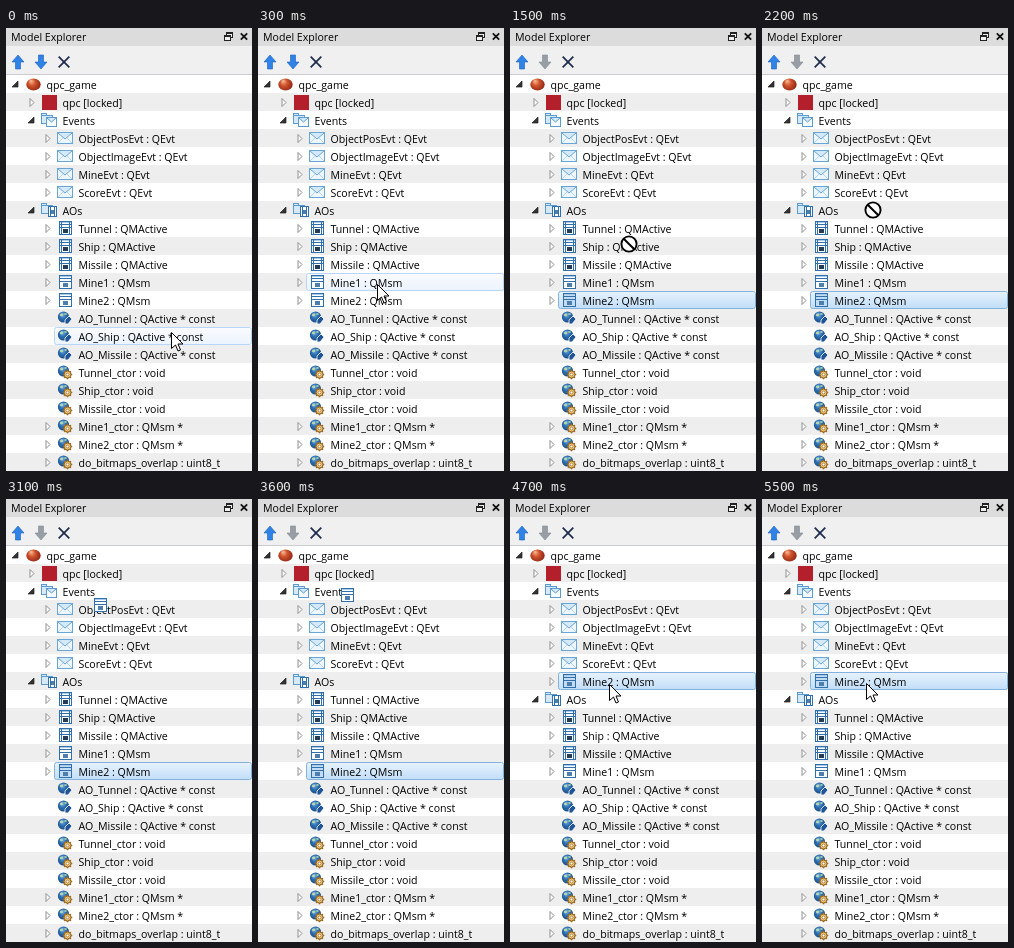
Animation, 246 px wide and 443 px high, one loop 5700 ms. Source, as an HTML page with a canvas:

```html
<!DOCTYPE html>
<html lang="en">
<head>
<meta charset="utf-8">
<title>Model Explorer</title>
<style>
html, body { margin: 0; width: 100%; height: 100%; overflow: hidden; background: #f0f0f0; }
canvas { display: block; width: 246px; height: 443px; }
</style>
</head>
<body>
<canvas id="stage" width="246" height="443"></canvas>
<script>
const ctx = document.getElementById('stage').getContext('2d');
const W = 246, H = 443, LOOP = 5700, STEP = 100;
const TOP = 47, ROW = 18;
const SELECT_AT = 1000, DRAG_AT = 1200, DROP_AT = 4100;
const BLUE = '#2f6fab', SKY = '#5b9bd0', PALE = '#d5e9f8';

// Tree items: [level, icon, label, expander]
const events = ['ObjectPosEvt', 'ObjectImageEvt', 'MineEvt', 'ScoreEvt']
  .map(n => [2, 'event', n + ' : QEvt', 'closed']);
const active = ['Tunnel', 'Ship', 'Missile'];
const mine2 = [2, 'machine', 'Mine2 : QMsm', 'closed'];
const eventsHead = [[0, 'model', 'qpc_game', 'open'], [1, 'framework', 'qpc [locked]', 'closed'],
  [1, 'package', 'Events', 'open'], ...events];
const objects = [[1, 'group', 'AOs', 'open'],
  ...active.map(n => [2, 'active', n + ' : QMActive', 'closed']),
  [2, 'machine', 'Mine1 : QMsm', 'closed']];
const members = [
  ...active.map(n => [2, 'attribute', `AO_${n} : QActive * const`]),
  ...active.map(n => [2, 'operation', n + '_ctor : void']),
  ...['Mine1_ctor : QMsm *', 'Mine2_ctor : QMsm *', 'do_bitmaps_overlap : uint8_t']
    .map(label => [2, 'operation', label, 'closed'])];
const before = [...eventsHead, ...objects, mine2, ...members];
const after = [...eventsHead, mine2, ...objects, ...members];

// Pointer path: [time, x, y]
const path = [[0, 165, 304], [400, 103, 240], [600, 86, 267], [800, 88, 271], [1000, 88, 271],
  [1500, 119, 216], [2000, 110, 182], [2100, 112, 183], [2200, 111, 182], [2700, 93, 126],
  [2800, 95, 118], [3100, 85, 97], [3300, 80, 92], [3600, 80, 87], [4400, 80, 87],
  [4700, 99, 185], [4800, 99, 185], [4900, 101, 186], [5000, 104, 185], [5100, 104, 185],
  [5200, 104, 183], [5400, 104, 183], [5500, 104, 184], [LOOP, 104, 184]];

function pointerAt(t) {
  const i = path.findIndex(p => p[0] > t);
  const [t0, x0, y0] = path[i - 1], [t1, x1, y1] = path[i];
  const k = (t - t0) / (t1 - t0);
  return [Math.round(x0 + (x1 - x0) * k), Math.round(y0 + (y1 - y0) * k)];
}

function rect(x, y, w, h, color) {
  ctx.fillStyle = color;
  ctx.fillRect(x, y, w, h);
}

function box(x, y, w, h, fill, stroke) {
  rect(x, y, w, h, stroke);
  rect(x + 1, y + 1, w - 2, h - 2, fill);
}

function shape(points, fill, stroke, width = 1, close = true) {
  ctx.beginPath();
  points.forEach(([x, y]) => ctx.lineTo(x, y));
  if (close) ctx.closePath();
  if (fill) { ctx.fillStyle = fill; ctx.fill(); }
  if (stroke) { ctx.strokeStyle = stroke; ctx.lineWidth = width; ctx.stroke(); }
}

function oval(x, y, rx, ry, fill, stroke, width = 1) {
  ctx.beginPath();
  ctx.ellipse(x, y, rx, ry, 0, 0, Math.PI * 2);
  if (fill) { ctx.fillStyle = fill; ctx.fill(); }
  if (stroke) { ctx.strokeStyle = stroke; ctx.lineWidth = width; ctx.stroke(); }
}

const disc = (x, y, r, ...paint) => oval(x, y, r, r, ...paint);

function text(label, x, y) {
  ctx.font = '10.6px "Open Sans", "Noto Sans", sans-serif';
  ctx.fillStyle = '#000';
  ctx.fillText(label, x, y);
}

function cross(x, y, r, color, width) {
  shape([[x - r, y - r], [x + r, y + r]], null, color, width, false);
  shape([[x + r, y - r], [x - r, y + r]], null, color, width, false);
}

function globe() {
  const g = ctx.createRadialGradient(-3, -4, 0, -1.5, -1, 7);
  g.addColorStop(0, '#8cc0ea');
  g.addColorStop(0.45, '#2f72b5');
  g.addColorStop(1, '#123f78');
  disc(-1.5, -1, 5.6, g);
  oval(-3.5, -3, 1.6, 1.2, '#b9d8a8');
  oval(0.5, -4, 1.4, 1, '#9cc9a4');
}

function gear(x, y, r) {
  for (let i = 0; i < 8; i++) {
    const a = i * Math.PI / 4;
    disc(x + Math.cos(a) * r, y + Math.sin(a) * r, 1.1, '#9a6a24');
  }
  disc(x, y, r - 0.4, '#ecc67a', '#9a6a24');
  disc(x, y, 1.4, '#fff', '#9a6a24', 0.7);
}

function classBox(selected) {
  box(-6, -7, 13, 14, selected ? '#c4dcf3' : '#fff', BLUE);
  rect(-5, -6, 11, 1, '#a9cbe8');
  rect(-5, -4, 11, 1, BLUE);
  rect(-5, -1, 11, 1, BLUE);
  rect(-2, 1, 5, 4, '#4d7fae');
}

function folder() {
  box(-8, -7, 6, 4, PALE, SKY);
  box(-8, -5, 12, 9, PALE, SKY);
}

// Every icon is drawn around its centre.
const icons = {
  model() {
    const g = ctx.createRadialGradient(-2, -3, 0.5, 0, 0, 8);
    g.addColorStop(0, '#f3b48f');
    g.addColorStop(0.4, '#d2552e');
    g.addColorStop(1, '#8c2413');
    oval(0.5, 0.5, 7.2, 6, g);
  },
  framework() { rect(-7, -7, 15, 15, '#b3202c'); },
  package() {
    folder();
    box(-3, -3, 11, 10, '#f4faff', SKY);
    shape([[-2, -2], [2.5, 2], [7, -2]], PALE, SKY, 1, false);
  },
  group() {
    folder();
    box(-1, -4, 9, 11, '#fff', BLUE);
    rect(1, -4, 1, 11, BLUE);
    rect(5, -4, 1, 11, BLUE);
    rect(2, 0, 3, 4, '#4b7fae');
  },
  event() {
    box(-8, -6, 16, 12, '#eef7fe', '#68a6d8');
    shape([[-7, -5], [0, 1], [7, -5]], PALE, '#68a6d8', 1, false);
    shape([[-7, 5], [-2, 0]], null, '#b5d5ee', 1, false);
    shape([[7, 5], [2, 0]], null, '#b5d5ee', 1, false);
  },
  machine: classBox,
  active(selected) {
    classBox(selected);
    rect(-4, -7, 1, 14, BLUE);
    rect(4, -7, 1, 14, BLUE);
    rect(-2, 1, 5, 4, '#243c55');
  },
  attribute() {
    globe();
    shape([[0, 2], [4, -2], [7, 1], [3, 6], [0, 6]], '#1f5596', '#fff', 0.8);
  },
  operation() {
    globe();
    gear(2.5, 2.5, 3.8);
  }
};

function drawIcon(name, x, y, selected) {
  ctx.save();
  ctx.translate(x, y);
  icons[name](selected);
  ctx.restore();
}

function highlight(level, y, from, to, border) {
  const x = 16 + level * 16;
  const g = ctx.createLinearGradient(0, y, 0, y + ROW);
  g.addColorStop(0, from);
  g.addColorStop(1, to);
  ctx.beginPath();
  ctx.roundRect(x + 0.5, y + 0.5, W - x - 1, ROW - 1, 2);
  ctx.fillStyle = g;
  ctx.fill();
  ctx.strokeStyle = border;
  ctx.lineWidth = 1;
  ctx.stroke();
}

function drawExpander(kind, x, y) {
  if (kind === 'open') shape([[x + 3, y - 3], [x + 3, y + 3], [x - 3, y + 3]], '#333', '#222', 0.7);
  else shape([[x - 1, y - 3.5], [x + 3, y + 0.5], [x - 1, y + 4.5]], '#fff', '#909090');
}

function drawTree(items, hovered, selecting) {
  items.forEach((item, i) => {
    const [level, icon, label, expander] = item;
    const y = TOP + i * ROW, indent = level * 16;
    const selected = selecting && item === mine2;
    rect(0, y, W, ROW, i % 2 ? '#eee' : '#fff');
    if (selected) highlight(level, y, '#e8f3fd', '#c0ddf8', '#84b2de');
    else if (i === hovered) highlight(level, y, '#fafbfd', '#ebf3fd', '#b8d6fb');
    if (expander) drawExpander(expander, 9 + indent, y + 9);
    drawIcon(icon, 27 + indent, y + 9, selected);
    text(label, 40.5 + indent, y + 14);
  });
}

function drawArrow(x, y, dir, color, edge) {
  const outline = [[0, -7], [6, 0], [2.5, 0], [2.5, 7], [-2.5, 7], [-2.5, 0], [-6, 0]];
  shape(outline.map(([dx, dy]) => [x + dx, y + dy * dir]), color, edge, 0.6);
}

function drawHeader(selecting) {
  rect(0, 0, W, TOP, '#f0f0f0');
  rect(0, 0, W, 18, '#dcdcdc');
  rect(0, TOP - 1, W, 1, '#c9cdd2');
  text('Model Explorer', 5, 13);
  for (const [x, y] of [[220, 4], [218, 7]]) {
    box(x, y, 7, 6, '#f0f0f0', '#222');
    rect(x, y, 7, 2, '#222');
  }
  cross(238, 8.5, 3.2, '#111', 1.8);
  drawArrow(12, 34, 1, '#2f83e6', '#1b5fc0');
  if (selecting) drawArrow(35, 34, -1, '#989ea6', '#848a93');
  else drawArrow(35, 34, -1, '#2f83e6', '#1b5fc0');
  cross(58, 34, 5.3, '#1c2b4a', 1.7);
}

function drawPointer(x, y) {
  const outline = [[0, 0], [0, 16], [4, 12.5], [6.5, 18.5], [9, 17.5], [6.5, 11.5], [11.5, 11.5]];
  shape(outline.map(([dx, dy]) => [x + 0.5 + dx, y + 0.5 + dy]), '#fff', '#000');
}

function drawForbidden(x, y) {
  disc(x, y, 7.6, '#fff', '#000', 1.9);
  shape([[x - 5.3, y - 5.3], [x + 5.3, y + 5.3]], null, '#000', 2, false);
}

function draw(t) {
  const [x, y] = pointerAt(t);
  const selecting = t >= SELECT_AT;
  const dragging = t >= DRAG_AT && t < DROP_AT;
  const row = Math.floor((y - TOP) / ROW);
  drawHeader(selecting);
  drawTree(t < DROP_AT ? before : after, dragging ? -1 : row, selecting);
  if (!dragging) drawPointer(x, y);
  else if (row === 2) drawIcon('machine', x + 9, y + 9);
  else drawForbidden(x, y);
}

function tick() {
  const t = performance.now() % LOOP;
  draw(Math.floor(t / STEP) * STEP);
  requestAnimationFrame(tick);
}
tick();
</script>
</body>
</html>
```
